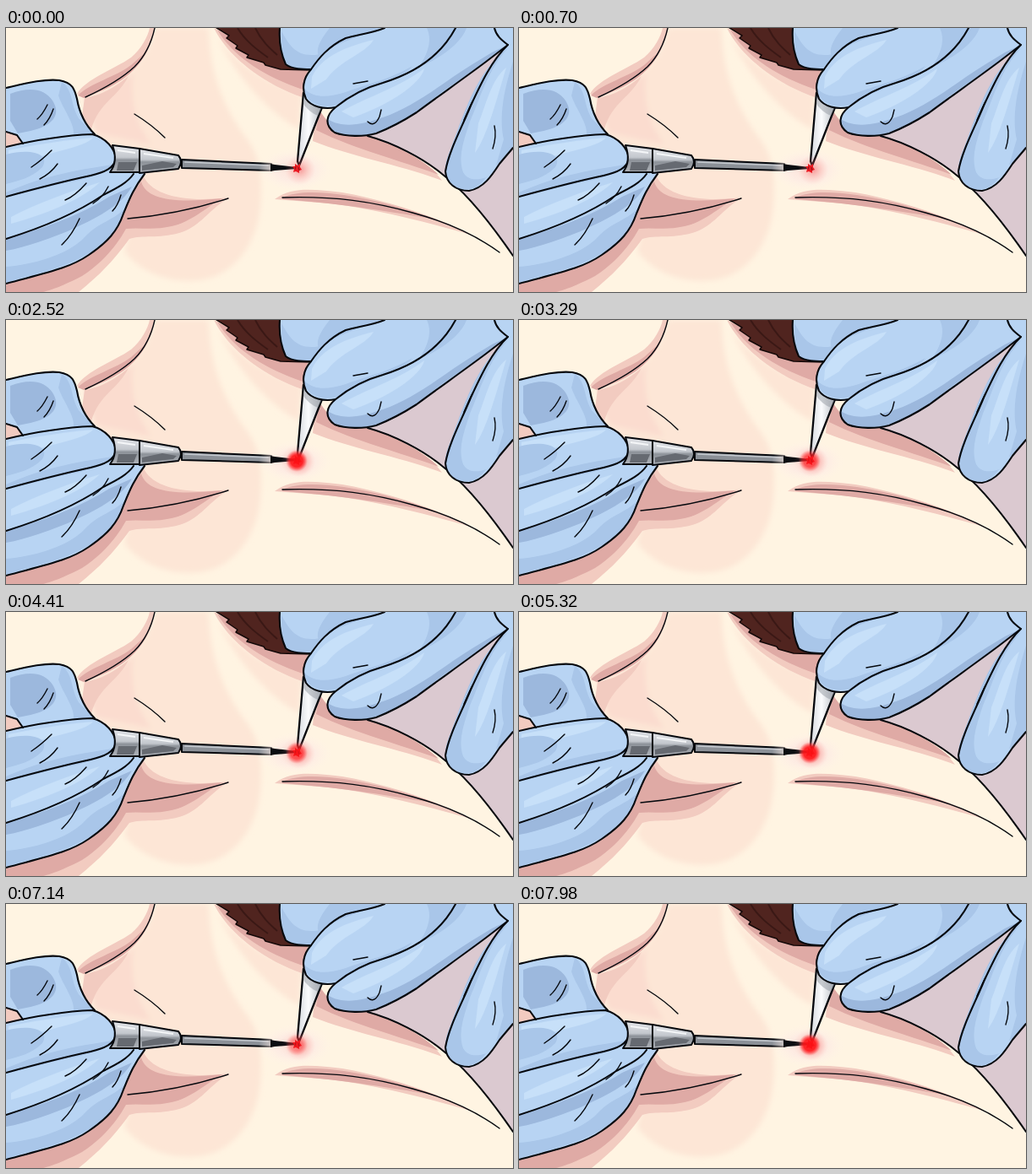
These frames come from a looping animation (600 by 313 pixels, 8000 ms). An HTML page:

```html
<!DOCTYPE html>
<html lang="en">
<head>
<meta charset="utf-8">
<title>Skin treatment</title>
<style>
  html, body { margin: 0; width: 100%; height: 100%; overflow: hidden; background: #fff4e2; }
  svg { display: block; width: 100vw; height: 100vh; }
  .ink { fill: none; stroke: #05080d; stroke-width: 2.1; stroke-linecap: round; stroke-linejoin: round; }
  .thin { stroke-width: 1.4; }
  .glove { fill: #b8d4f3; }
  .shade { fill: #9cb8dd; }
  .mid { fill: #a9c6e9; }
  .lit { fill: #c7e0f9; }
  .blush { fill: #dfaaa5; }
  .soft { fill: #f2cbc0; }
  .tone { fill: #fde6d6; }
</style>
</head>
<body>
<svg viewBox="0 0 600 313" preserveAspectRatio="none">
  <defs>
    <linearGradient id="metal" x1="0" y1="0" x2="0" y2="1">
      <stop offset="0" stop-color="#e3e5e9"/>
      <stop offset=".45" stop-color="#c3c7cd"/>
      <stop offset=".55" stop-color="#8d9299"/>
      <stop offset="1" stop-color="#b0b4ba"/>
    </linearGradient>
    <linearGradient id="tongs">
      <stop offset="0" stop-color="#d5d9de"/>
      <stop offset=".45" stop-color="#fbfcfd"/>
      <stop offset="1" stop-color="#b8bdc4"/>
    </linearGradient>
    <radialGradient id="pale">
      <stop offset="0" stop-color="#fbdcd6"/>
      <stop offset=".55" stop-color="#fdeae4"/>
      <stop offset="1" stop-color="#fff2e8" stop-opacity="0"/>
    </radialGradient>
    <radialGradient id="halo">
      <stop offset="0" stop-color="#f0404a" stop-opacity=".85"/>
      <stop offset=".45" stop-color="#f46a6c" stop-opacity=".45"/>
      <stop offset="1" stop-color="#f99" stop-opacity="0"/>
    </radialGradient>
    <radialGradient id="flare">
      <stop offset="0" stop-color="#ff1014"/>
      <stop offset=".55" stop-color="#ff1418"/>
      <stop offset=".75" stop-color="#ff2c30" stop-opacity=".65"/>
      <stop offset="1" stop-color="#ff6060" stop-opacity="0"/>
    </radialGradient>
    <filter id="blur" x="-20%" y="-20%" width="140%" height="140%">
      <feGaussianBlur stdDeviation="3"/>
    </filter>
  </defs>

  <g id="skin">
    <path fill="#fff4e2" d="M0 0H600V313H0Z"/>
    <g filter="url(#blur)">
      <path class="tone" d="M176 0H240C240 45 254 90 284 130C300 150 304 175 301 212C297 255 272 290 235 298C195 305 160 290 140 265L160 180L104 126L92 82C130 70 168 45 176 0Z"/>
      <path class="tone" d="M250 10C270 40 305 62 350 78L347 120C318 105 275 65 250 10Z"/>
      <path fill="#fbdccf" d="M92 82C118 78 136 68 150 52C148 84 150 108 172 138L106 124Z"/>
    </g>
    <path fill="#dbc9d0" d="M428 128C458 136 493 154 516 173C546 196 574 232 600 270V0H430Z"/>
    <path class="soft" d="M246 0C262 32 300 64 350 82L358 48L300 38L262 8Z"/>
    <path class="blush" d="M250 2C268 33 304 57 351 73L358 47L302 39L262 9Z"/>
    <path class="soft" d="M366 104L392 126L429 128C473 143 503 162 516 181C470 163 410 153 363 134Z"/>
    <path class="blush" d="M371 98L392 126L429 128C465 140 495 157 512 174C470 158 416 145 367 121Z"/>

    <path class="soft" d="M176 0C170 42 140 66 93 82L84 78C95 60 128 49 148 35C160 25 168 10 170 0Z"/>
    <path class="blush" d="M167 27C152 56 130 69 92 83L85 80C100 65 130 58 148 44Z"/>
    <path class="soft" d="M93 83C113 80 129 70 145 57C132 83 110 88 101 120L90 104Z"/>
    <path class="soft" d="M0 122L14 126L20 138L0 142Z"/>

    <path class="soft" d="M162 174C172 200 215 207 264 201C240 215 230 236 205 243C180 250 162 245 146 250C128 275 112 292 86 313H0V296Z"/>
    <path class="blush" d="M160 182C166 204 200 208 256 202C235 214 219 230 196 235C175 240 158 236 142 238C130 260 112 280 90 294C67 306 55 310 44 313H0V299L95 270Z"/>

    <path class="soft" d="M318 203C340 187 366 192 398 195C450 204 510 224 553 246C500 231 427 211 370 207Z"/>
    <path class="blush" d="M327 201C345 193 370 194 400 198C440 204 476 215 510 227C460 219 400 208 327 203Z"/>

    <g class="ink thin">
      <path d="M176 0C172 18 165 33 152 46C138 59 120 70 94 82"/>
      <path d="M152 102C165 110 177 119 188 130"/>
      <path d="M144 226C190 222 229 213 263 202"/>
      <path d="M327 201C390 199 435 206 481 219C525 231 558 247 584 266"/>
    </g>
    <path class="ink" d="M428 128C458 136 493 154 516 173C546 196 574 232 600 270"/>
  </g>

  <g id="hair">
    <path fill="#50241f" stroke="#140808" stroke-width="1.5" stroke-linejoin="round" d="M246 -2L264 9L261 12L274 21L272 24L287 32L285 35L305 41L307 44L325 49L360 50L345 -2Z"/>
    <path fill="none" stroke="#3a1815" stroke-width="2" d="M274 0C283 15 296 25 310 35M295 0C302 15 312 24 321 32"/>
  </g>

  <g id="left-hand">
    <path class="glove" d="M0 71C22 66 45 60 63 62C79 65 81 72 84 84C87 102 95 116 105 126C118 131 128 144 130 155L164 173C151 190 146 203 139 220C132 241 120 254 98 269C75 285 48 290 0 303V142L20 137L14 127L0 123Z"/>
    <path class="shade" d="M5 78C28 69 46 72 55 86C66 103 55 116 29 122L14 125L5 110Z"/>
    <path class="mid" d="M66 64C80 74 76 91 86 107L104 126L80 128C82 113 67 96 62 80Z"/>
    <path class="lit" d="M3 145C36 138 77 132 103 130C92 142 52 147 2 163Z"/>
    <path class="mid" d="M0 195C34 180 65 171 126 162C121 172 99 178 79 182C48 188 25 196 0 201Z"/>
    <path class="mid" d="M0 150C30 142 53 150 43 165C30 178 15 181 0 185Z"/>
    <path class="shade" d="M0 249C42 239 88 222 122 200L149 188C136 211 106 226 73 241C45 252 23 260 0 264Z"/>
    <path class="mid" d="M142 213C132 246 116 258 95 269C66 286 34 291 0 302V283C37 280 76 267 94 247C110 230 126 229 142 213Z"/>
    <path class="lit" d="M6 224C39 207 72 195 111 183C91 202 53 219 6 232Z"/>
    <g class="ink">
      <path d="M0 71C22 66 45 60 63 62C79 65 81 72 84 84C87 102 95 116 105 126M0 123L13 127L20 137"/>
      <path d="M0 141C38 132 76 127 102 126C118 130 129 143 130 155C128 166 117 171 100 175C67 182 33 191 0 200"/>
      <path d="M0 250C42 237 84 219 115 198C133 189 144 183 151 173"/>
      <path d="M164 173C151 190 146 203 139 220C132 241 120 254 98 269C75 285 48 290 0 303"/>
    </g>
    <g class="ink thin">
      <path d="M37 108C43 103 46 97 49 91M45 115C51 109 54 102 56 96M30 165C39 159 47 152 54 145M40 179C50 174 56 168 61 161"/>
      <path d="M70 204C80 200 88 192 95 184M103 208C111 203 117 196 121 188M126 217C131 212 134 205 136 198M66 257C76 248 82 237 87 226"/>
    </g>
  </g>

  <g id="probe" stroke="#05080d" stroke-width="2" stroke-linejoin="round">
    <path fill="url(#metal)" d="M126 139L158 143V171L123 171C130 162 130 150 126 139Z"/>
    <path fill="url(#metal)" d="M158 143L204 151Q210 158 204 167L158 172Z"/>
    <path fill="#8b9097" d="M208 156L314 161V169L208 166Z"/>
    <path fill="none" stroke="#f4f6f8" d="M132 145L153 148M163 149L198 154"/>
    <path fill="#666a71" stroke="none" d="M133 159H155L151 169H131ZM161 163L185 158L202 161L198 165L161 169Z"/>
    <path fill="none" stroke="#c3c8ce" stroke-width="1.5" d="M211 159L311 163"/>
  </g>

  <ellipse cx="342" cy="168" rx="43" ry="25" fill="url(#pale)" opacity=".75"/>
  <path fill="#0b0d11" d="M313 161L318 162L344 165V167L318 169L313 170Z"/>

  <g id="tweezers">
    <path fill="url(#tongs)" stroke="#05080d" stroke-width="2.3" stroke-linejoin="round" d="M352 77L345 158L347 163L374 94Z"/>
    <path fill="#949aa2" d="M353 79L374 94L369 104C362 101 356 96 352 90Z" opacity=".5"/>
  </g>

  <g id="right-hand">
    <path class="glove" d="M324 0C323 14 325 30 331 43C339 49 351 49 361 49C351 60 350 73 355 84C361 93 376 97 390 94C379 103 376 115 389 124C402 129 423 129 438 125C456 118 472 109 486 100C510 82 540 61 568 40L594 20H600V0Z"/>
    <path class="mid" d="M326 4C336 21 344 38 377 30C370 38 364 43 360 48C343 50 331 46 327 34Z"/>
    <path class="mid" d="M383 0H442C420 12 392 14 371 35C365 25 373 13 383 0Z"/>
    <path class="mid" d="M353 72C365 84 382 82 402 76C428 66 452 62 481 45C466 64 428 69 400 88C379 98 354 91 353 72Z"/>
    <path class="shade" d="M381 108C397 119 421 115 446 106C484 93 518 64 552 43L575 29L592 21C554 53 522 68 486 100C456 120 431 129 405 128C389 126 379 117 381 108Z"/>
    <path class="lit" d="M362 58C373 34 402 22 435 14C425 31 396 37 379 61L361 72Z"/>
    <path class="lit" d="M397 99C427 82 468 69 495 48C491 67 451 92 411 106Z"/>
    <path class="mid" d="M498 0H545C539 18 514 36 489 46C501 27 504 13 498 0Z"/>
    <g class="ink">
      <path d="M324 0C323 14 325 30 331 43C339 49 351 49 361 49C370 36 381 22 402 12C416 8 433 6 448 0"/>
      <path d="M361 49C351 60 350 73 355 84C361 93 376 97 390 94C406 81 424 71 446 65C482 54 514 34 532 0"/>
      <path d="M390 94C379 103 376 115 389 124C402 129 423 129 438 125C456 118 472 109 486 100C510 82 540 61 568 40L594 20"/>
      <path d="M578 0C580 9 586 14 594 20"/>
    </g>
    <path class="ink thin" d="M411 66L428 63M428 111C434 117 439 112 442 105L444 97"/>

    <path class="glove" d="M594 20C575 38 562 66 550 92C539 119 524 146 520 170C521 184 532 193 548 193C565 190 575 175 584 161L600 142V18Z"/>
    <path class="mid" d="M594 24C571 48 562 81 549 111C541 135 535 153 541 171C547 182 560 180 568 177C559 190 547 195 533 189C517 183 517 164 526 144C539 110 556 50 594 24Z"/>
    <path class="mid" d="M600 40C587 80 584 109 589 132L580 163L600 142Z"/>
    <path class="lit" d="M592 47C574 61 568 92 559 113L555 148C569 130 581 83 592 47Z"/>
    <path class="ink" d="M594 20C575 38 562 66 550 92C539 119 524 146 520 170C521 184 532 193 548 193C565 190 575 175 584 161L600 142"/>
    <path class="ink thin" d="M578 116C580 125 579 134 576 143M552 87C548 95 545 102 542 109"/>
  </g>

  <g id="lesion">
    <circle cx="348" cy="168" r="18" fill="url(#halo)" opacity=".55"/>
    <path fill="#ea1a22" d="M342 161L345 163L348 161L348 165L350 168L347 169L347 172L343 170L340 171L341 167L339 164L342 164Z"/>
    <path fill="none" stroke="#8d1014" d="M343 164L342 168M346 165L347 169"/>
  </g>
  <g id="glow" opacity="0">
    <circle cx="344" cy="167" r="19" fill="url(#halo)" opacity=".5"/>
    <circle cx="344" cy="167" r="13" fill="url(#flare)"/>
  </g>
</svg>
<script>
  const LOOP = 8000, STEP = 70, PULSE = 10;
  const glow = document.getElementById('glow');
  const start = performance.now();

  // A smooth swell and fade, held for one step at a time.
  function draw() {
    const time = (performance.now() - start) % LOOP;
    const phase = Math.floor(time / STEP) / PULSE;
    glow.setAttribute('opacity', (1 - Math.cos(2 * Math.PI * phase)) / 2);
    requestAnimationFrame(draw);
  }
  draw();
</script>
</body>
</html>
```
